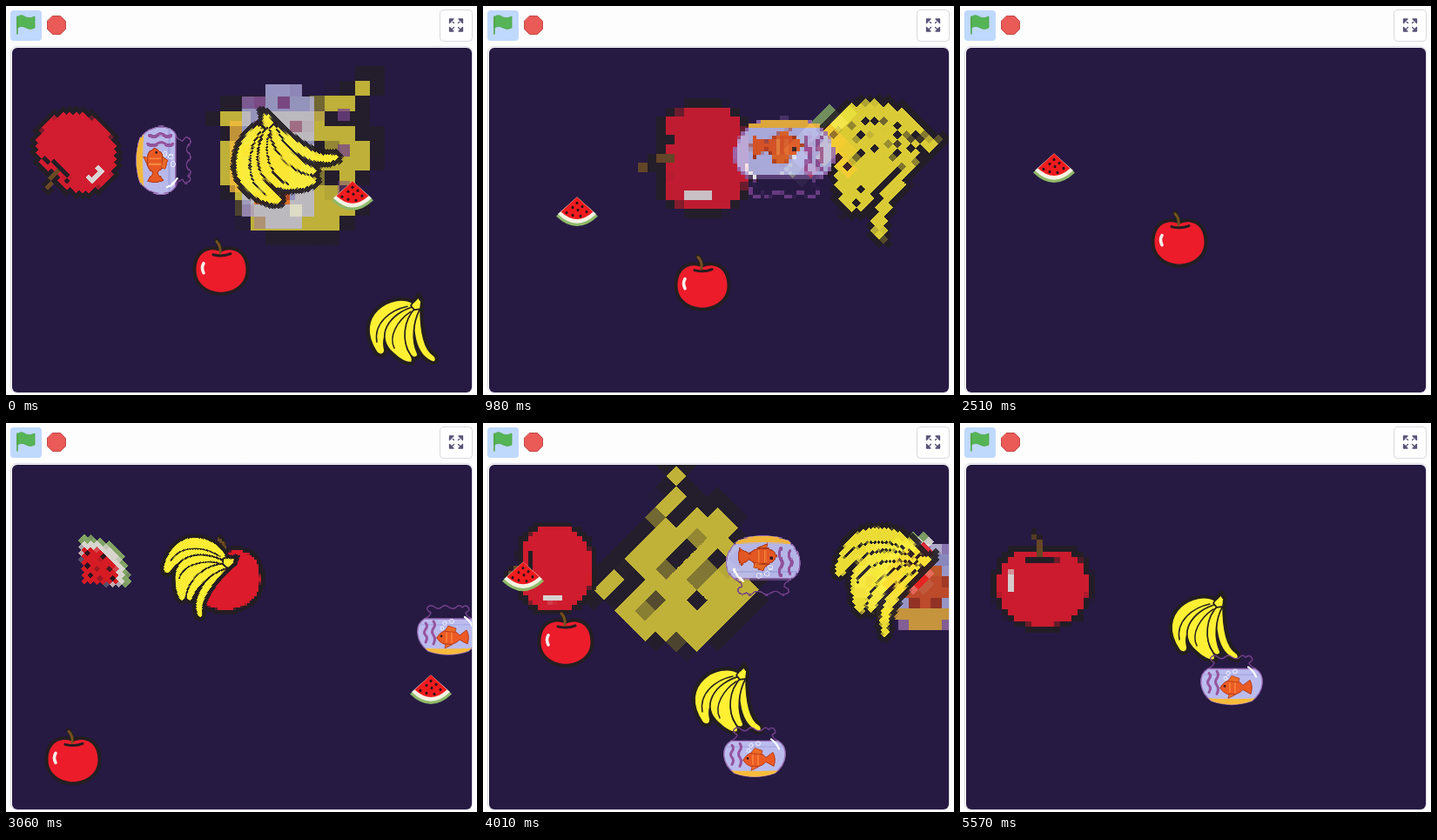
Recreate the animation shown at these times as an HTML page with a canvas. Size 541x447 px, loop 5640 ms.

```html
<!DOCTYPE html>
<html lang="en">
<head>
<meta charset="utf-8">
<title>Fruit toss</title>
<style>
  html, body { margin: 0; width: 100%; height: 100%; overflow: hidden; background: #fdfdfd; }
  canvas { display: block; }
</style>
</head>
<body>
<canvas id="stage" width="541" height="447"></canvas>
<script>
const LOOP = 5640;
const ctx = document.getElementById('stage').getContext('2d');

// Path helper: fill and/or stroke an SVG path.
function shape(g, d, fill, stroke, width = 1) {
  const p = new Path2D(d);
  if (fill) { g.fillStyle = fill; g.fill(p); }
  if (stroke) {
    g.strokeStyle = stroke;
    g.lineWidth = width;
    g.lineJoin = g.lineCap = 'round';
    g.stroke(p);
  }
}

function dot(g, x, y, rx, ry, fill) {
  g.beginPath();
  g.ellipse(x, y, rx, ry, 0, 0, 7);
  g.fillStyle = fill;
  g.fill();
}

const INK = '#231e22';

const draw = {
  apple(g) {
    const body = 'M0-17C8-22 28.500-21 28.500 4C28.500 20 14 29 0 29C-14 29-28.500 20-28.500 4C-28.500-21-8-22 0-17Z';
    shape(g, body, null, INK, 8);
    shape(g, 'M-1-14Q0-24-5-30', null, INK, 6);
    shape(g, body, '#ec1c2b');
    shape(g, 'M-9-14Q2-11 11-15', null, INK, 3);
    shape(g, 'M-1-16Q0-24-5-29', null, '#74501f', 3);
    shape(g, 'M-20-4Q-23 1-20 7', null, '#f6efe9', 3.6);
  },

  banana(g) {
    const skin = '#fff033';
    const parts = [
      'M12-30C-10-43-58-16-29 27C-25 31-20 29-20 24C-26 2-6-14 13-23Z',
      'M17-27C9-4 14 31 36 38C40 37 39 32 36 30C25 23 21 0 21-25Z',
      'M14-26C-16-18-32 10-10 28C-3 35 6 40 11 38C14 33 8 28 6 23C0 4 7-10 17-22Z',
      'M16-25C1-10-1 14 10 30C13 34 18 33 18 29C10 12 13-8 20-22Z',
      'M10-27C13-33 18-33 19-38L22-32L21-23L14-22Z'
    ];
    for (const d of parts) shape(g, d, null, INK, 7);
    for (const d of parts) shape(g, d, skin, INK, 1.7);
    shape(g, 'M-29 15C-33-6-14-22 6-26M-9 22C-16 8-5-10 10-20', null, INK, 1.5);
    shape(g, 'M19-36L21-33', null, INK, 2);
  },

  bowl(g) {
    const water = 'M-27-12C-39-5-38 14-23 25Q0 33 23 25C38 14 39-5 27-12Z';
    shape(g, 'M-27-12Q-21-15-20-19Q-27-23-23-26Q-19-29-15-25Q-11-22-7-26Q-3-29 1-25Q6-22 10-26Q13-29 16-25Q20-29 23-25Q26-22 20-19Q21-15 27-12',
      null, '#74408a', 1.4);
    shape(g, water, '#bbbcee', '#9a6fb6', 1.4);
    g.save();
    g.clip(new Path2D(water));
    g.fillStyle = '#a9abe4';
    g.fillRect(-40, -6, 80, 1.5);
    shape(g, 'M-40 21Q0 24 40 21V35H-40Z', '#f8bb3c');
    g.restore();
    shape(g, 'M-26-7q3 3 0 7t0 7t0 8M-17-9q3 4 0 8t0 8t0 10', null, '#96549f', 3);
    shape(g, 'M-13 10C-8-1 6-2 13 7L21 1Q25 8 22 17L13 12C6 20-8 20-13 10Z', '#ec5a24', '#b43a1b', 1);
    shape(g, 'M-4 2L0-4L9-1L8 3ZM-3 17L-4 22L4 18Z', '#ee6b25', '#b43a1b', .8);
    shape(g, 'M-2 4v11M4 4v11', null, '#fb8a3c', 1.4);
    dot(g, -8, 8, 1.4, 1.4, '#3a1a20');
    g.strokeStyle = '#eef0ff';
    g.lineWidth = 1;
    for (const [x, y, r] of [[-7, -1, 2], [-4, -7, 2.2], [4, -9, 2.5]]) {
      g.beginPath();
      g.arc(x, y, r, 0, 7);
      g.stroke();
    }
    shape(g, 'M19-14Q25-10 28-3', null, '#ffffff', 2.2);
  },

  melon(g) {
    shape(g, 'M0-17L-24 5Q0 28 24 5Z', '#8fb968');
    shape(g, 'M0-17L-22 2.500Q0 24 22 2.500Z', '#f3f2e4');
    shape(g, 'M0-17L-18.500 0Q0 17 18.500 0Z', '#f01b1e');
    for (const [x, y] of [[0, -10], [-5, -5], [6, -6], [1, -2], [-12, 1], [-5, 4], [4, 5], [11, 0]])
      dot(g, x, y, 1.5, 1.7, '#25151a');
  }
};

// Copies of each sprite, sampled by the pixel effect.
const BOX = 96, RES = 192;
function sheet(size) {
  const c = document.createElement('canvas');
  c.width = c.height = size;
  return c;
}
const sharp = {};
for (const kind in draw) {
  const c = sheet(RES), g = c.getContext('2d');
  g.scale(RES / BOX, RES / BOX);
  g.translate(BOX / 2, BOX / 2);
  draw[kind](g);
  sharp[kind] = c;
}
const cells = sheet(BOX), cellCtx = cells.getContext('2d');

// kind, x, y and tick at which the item bursts
const items = [
  ['banana', 332, 172, -29.5],
  ['bowl', 326, 173, -25.5],
  ['apple', 77, 172, -12.5],
  ['banana', 311, 175, -6.5],
  ['bowl', 182, 177, -1.5],
  ['melon', 398, 166, 3.6],
  ['apple', 247, 175, 8.6],
  ['banana', 455, 174, 13.6],
  ['bowl', 346, 176, 18.6],
  ['melon', 108, 164, 83.4],
  ['apple', 252, 174, 88.3],
  ['banana', 222, 168, 95.9],
  ['bowl', 508, 170, 100.9],
  ['melon', 488, 167, 105.9],
  ['apple', 77, 167, 111.2],
  ['banana', 461, 170, 116.2],
  ['bowl', 322, 165, 121.2],
  ['melon', 46, 168, 124.9],
  ['apple', 95, 181, 159.2],
  ['banana', 281, 170, 237.7],
  ['bowl', 312, 170, 297]
];

// Phases: start in ms, ms per tick, rise in pixels per tick
const phases = [[0, 33.3, 14.5], [615, 31, 1.02], [2585, 33.3, 14.5], [4070, 31, 1.02]];
let from = 0, risen = 0;
const spans = phases.map(([start, step, rise], i) => {
  const span = { start, step, rise, tick: from, risen };
  const end = i < 3 ? phases[i + 1][0] : LOOP;
  const n = (end - start) / step;
  from += n;
  risen += n * rise;
  return span;
});

function tickAt(ms) {
  const s = spans.findLast(p => ms >= p.start);
  return s.tick + (ms - s.start) / s.step;
}

function spanAt(tick) {
  return spans.findLast(p => tick >= p.tick) || spans[0];
}

function riseAt(tick) {
  const s = spanAt(tick);
  return s.risen + (tick - s.tick) * s.rise;
}

// The picture is held in runs of eight steps: first and last step of each run.
const runs = [[70, 600], [670, 1230], [1300, 1830], [1900, 2440], [2510, 3060],
  [3160, 3690], [3770, 4290], [4390, 4930], [5020, 5570]];
function hold(ms) {
  const run = runs.findLast(r => ms + 10 >= r[0]);
  if (!run) return 0;
  const step = (run[1] - run[0]) / 7;
  return run[0] + step * Math.min(7, Math.floor((ms + 10 - run[0]) / step));
}

function burst(kind, x, y, n) {
  const size = BOX * (1 + .05 * n);
  const m = Math.round(BOX / Math.max(1, .235 * n));
  cellCtx.imageSmoothingEnabled = false;
  cellCtx.clearRect(0, 0, BOX, BOX);
  cellCtx.drawImage(sharp[kind], 0, 0, RES, RES, 0, 0, m, m);
  ctx.save();
  ctx.imageSmoothingEnabled = false;
  ctx.globalAlpha = 1 - .01 * n;
  ctx.translate(x, y);
  ctx.rotate(n * Math.PI / 4);
  ctx.drawImage(cells, 0, 0, m, m, -size / 2, -size / 2, size, size);
  ctx.restore();
}

function panel(x, y, w, h, r, fill, stroke) {
  ctx.beginPath();
  ctx.roundRect(x, y, w, h, r);
  ctx.fillStyle = fill;
  ctx.fill();
  if (stroke) {
    ctx.strokeStyle = stroke;
    ctx.lineWidth = 1;
    ctx.stroke();
  }
}

function controls() {
  ctx.fillStyle = '#fdfdfd';
  ctx.fillRect(0, 0, 541, 447);
  panel(5, 5, 36, 35, 4, '#bfd9fd');
  shape(ctx, 'M13 13C17 9 20 11 23 13Q28 15 33 12V25Q28 28 23 25Q18 22 13 25Z', '#55b556', '#4fa54a', .8);
  shape(ctx, 'M13 12V32', null, '#4fa54a', 1.6);
  shape(ctx, 'M53.500 11.500H62.500L68.500 17.500V26.500L62.500 32.500H53.500L47.500 26.500V17.500Z', '#ea5a57', '#c24a48', 1);
  panel(498.5, 4.5, 37, 36, 4, '#ffffff', '#d9d9df');
  for (const sx of [-1, 1]) for (const sy of [-1, 1]) {
    ctx.save();
    ctx.translate(517, 22);
    ctx.scale(sx, sy);
    shape(ctx, 'M7.500 2.500V7H3ZM2.500 2.500L6 6', '#575378', '#575378', 1.3);
    ctx.restore();
  }
}

function paint(ms) {
  const tick = tickAt(hold(ms));
  const span = spanAt(tick);
  // New items enter only while the toss is fast.
  const entry = span.rise > 2 ? riseAt(tick) : span.risen;
  controls();
  panel(5.5, 46.5, 530, 398, 7, '#ffffff', '#d9d9e2');
  ctx.save();
  ctx.beginPath();
  ctx.roundRect(7, 48, 528, 396, 6);
  ctx.clip();
  ctx.fillStyle = '#261a43';
  ctx.fillRect(7, 48, 528, 396);
  for (const [kind, x, y, hit] of items) {
    if (tick >= hit) {
      const n = Math.floor(tick - hit) + 1;
      if (n <= 30) burst(kind, x, y, n);
      continue;
    }
    const goal = y + riseAt(hit);
    if (goal - entry > 415) continue;
    ctx.save();
    ctx.translate(x, goal - riseAt(tick));
    draw[kind](ctx);
    ctx.restore();
  }
  ctx.restore();
}

const begin = performance.now();
function frame() {
  paint((performance.now() - begin) % LOOP);
  requestAnimationFrame(frame);
}
frame();
</script>
</body>
</html>
```
